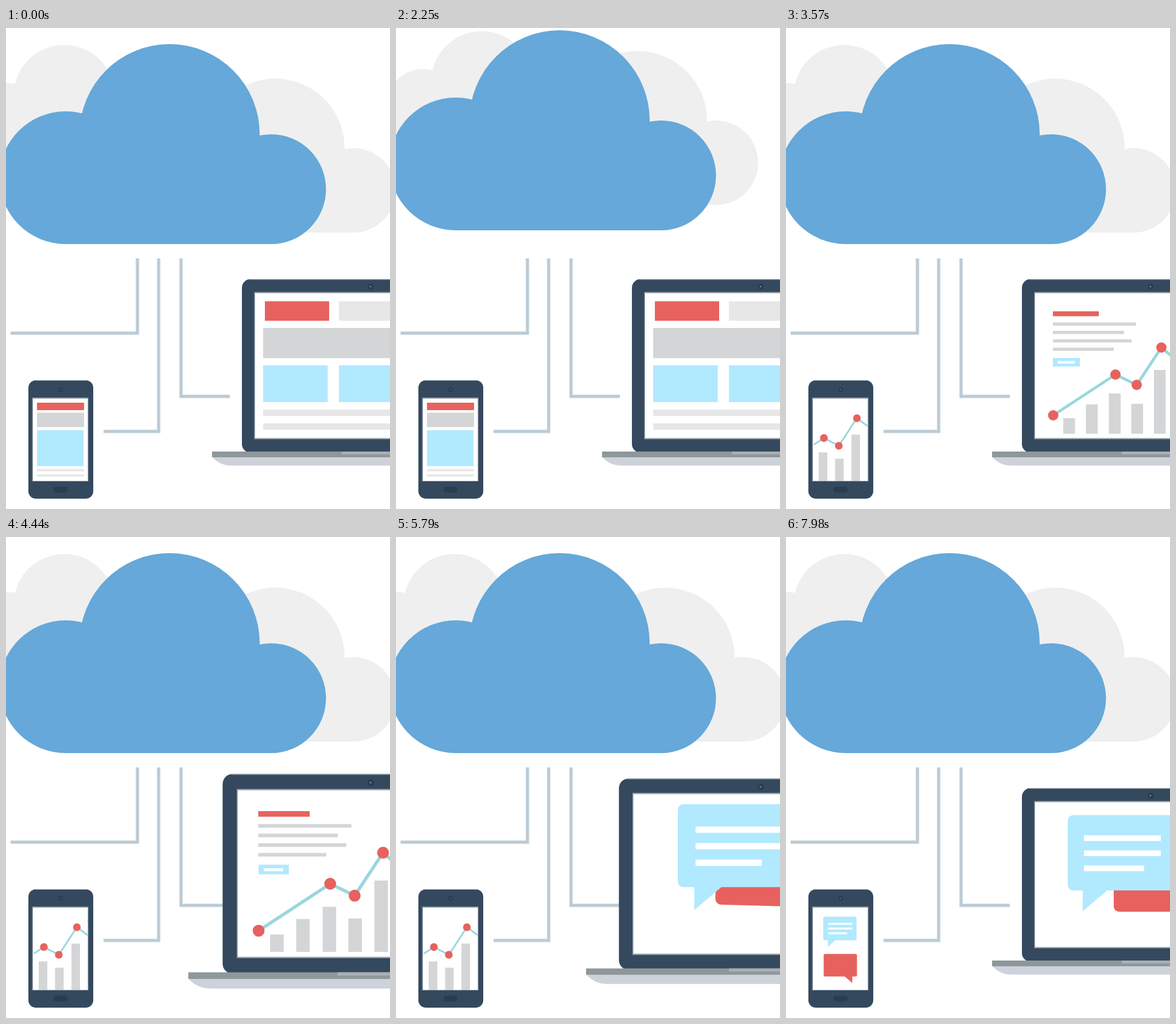
Animation of 669 by 837 pixels, one loop 8 s. Source, as an HTML page with a canvas:

```html
<!DOCTYPE html>
<html lang="en">
<head>
<meta charset="utf-8">
<title>Cloud sync</title>
<style>
  html, body { margin: 0; width: 100%; height: 100%; overflow: hidden; background: #fff; }
  canvas { display: block; }
</style>
</head>
<body>
<canvas id="stage" width="669" height="837"></canvas>
<script>
const ctx = document.getElementById('stage').getContext('2d');
const LOOP = 8000;
const DARK = '#34495e', DEEP = '#2c3c4f', RED = '#e7625e', SKY = '#b1e9ff',
      MID = '#d4d5d7', PALE = '#e7e7e7', BLUE = '#65a8d9', GREY = '#efefef', WIRE = '#bccad4';

const WIRES = {
  left: [[229, 401], [229, 531], [8, 531]],
  middle: [[266, 401], [266, 702], [170, 702]],
  right: [[305, 401], [305, 641], [390, 641]]
};

// Timing helpers
const clamp = v => Math.min(1, Math.max(0, v));
const span = (t, start, length) => clamp((t - start) / length);
const inOut = p => p < .5 ? 2 * p * p : 1 - 2 * (1 - p) * (1 - p);
const out = p => 1 - (1 - p) ** 3;
const back = p => 1 + 2.7 * (p - 1) ** 3 + 1.7 * (p - 1) ** 2;
const swell = (t, grow, shrink) =>
  1 + .15 * (back(span(t, grow, 240)) - inOut(span(t, shrink, 250)));
const bounce = (t, start) => out(span(t, start, 200)) - inOut(span(t, start + 200, 250));

// Drawing helpers
function box(x, y, w, h, color, r = 0) {
  ctx.fillStyle = color;
  ctx.beginPath();
  ctx.roundRect(x, y, w, h, r);
  ctx.fill();
}
function disc(x, y, r, color) {
  ctx.fillStyle = color;
  ctx.beginPath();
  ctx.arc(x, y, Math.max(0, r), 0, 7);
  ctx.fill();
}
function polygon(points, color) {
  ctx.fillStyle = color;
  ctx.beginPath();
  points.forEach(p => ctx.lineTo(...p));
  ctx.fill();
}
function polyline(points, color, width) {
  ctx.strokeStyle = color;
  ctx.lineWidth = width;
  ctx.beginPath();
  points.forEach(p => ctx.lineTo(...p));
  ctx.stroke();
}
function scaled(x, y, s, draw) {
  ctx.save();
  ctx.translate(x, y);
  ctx.scale(s, s);
  ctx.translate(-x, -y);
  draw();
  ctx.restore();
}
const distance = (a, b) => Math.hypot(b[0] - a[0], b[1] - a[1]);

// Point on a path and the part of the path leading to it
function follow(points, p) {
  const total = points.slice(1).reduce((sum, q, i) => sum + distance(points[i], q), 0);
  let rest = p * total;
  const passed = [points[0]];
  for (let i = 1; i < points.length; i++) {
    const a = points[i - 1], b = points[i], d = distance(a, b);
    const k = Math.min(1, rest / d);
    passed.push([a[0] + (b[0] - a[0]) * k, a[1] + (b[1] - a[1]) * k]);
    if (rest <= d) break;
    rest -= d;
  }
  return passed;
}

// A cloud placed by the centre of its big lobe
function cloud(x, y, s, color) {
  ctx.save();
  ctx.translate(x, y);
  ctx.scale(s, s);
  disc(0, 0, 157, color);
  disc(-181, 75.5, 115.5, color);
  disc(177, 95.5, 95.5, color);
  box(-154, 2, 311, 189, color);
  box(-181, 75, 358, 116, color);
  ctx.restore();
}

function clouds(t) {
  const b = bounce(t, 2050) + bounce(t, 6240);
  cloud(101.5 + 48 * b, 118 - 24 * b, .563, GREY);
  cloud(469 - 48 * b, 209 - 48 * b, .77, GREY);
  cloud(285, 185 - 24 * b, 1, BLUE);
}

function packet(t, wire, start, length, up) {
  const p = (t - start) / length;
  if (p < 0 || p > 1) return;
  const [x, y] = follow(WIRES[wire], inOut(up ? 1 - p : p)).pop();
  disc(x, y, 9.5, '#689fcb');
}

// Speech bubble placed by the tip of its tail; dir -1 mirrors it
function bubble(x, y, s, p, dir, color) {
  if (p <= 0) return;
  const angle = -dir * 55 * Math.exp(-3.6 * p) * (1 - p) * -Math.cos(2 * Math.PI * p);
  const height = dir > 0 ? 131 : 125;
  ctx.save();
  ctx.translate(x, y);
  ctx.rotate(angle * Math.PI / 180);
  s *= back(clamp(p * 2));
  ctx.scale(dir * s, s);
  box(-26, -36 - height, 185, height, color, 9);
  polygon([[0, 0], [0, -38], [45, -38]], color);
  if (dir > 0) [134, 134, 105].forEach((w, i) => box(2, -132 + 26.2 * i, w, 10, '#fff'));
  ctx.restore();
}

// Blocks of [x, y, width, height, colour] that shrink around their centres
function blocks(list, k) {
  if (k <= 0) return;
  for (const [x, y, w, h, color] of list)
    scaled(x + w / 2, y + h / 2, k, () => box(x, y, w, h, color));
}

function chart(bars, barWidth, base, points, dots, radius, width, k) {
  if (k <= 0) return;
  bars.forEach(([x, y]) => box(x, base - (base - y) * k, barWidth, (base - y) * k, MID));
  polyline(follow(points, k), '#9bd6df', width);
  dots.forEach((n, i) => disc(...points[n], radius * back(clamp(k * 2 - i * .25)), RED));
}

function laptop(t) {
  const s = swell(t, 4170, 5690);
  scaled(635, 600, s, () => {
    box(411, 437, 448, 302, DARK, 15);
    box(424, 437, 422, 1.2, '#8795a0');
    disc(635.5, 450, 5, DEEP);
    disc(635, 450, 1.3, '#8295a8');
    box(432.5, 459.5, 405, 256, '#9ca6b0');
    box(434, 461.5, 402, 252, '#fff');
    ctx.fillStyle = '#cdd2db';
    ctx.beginPath();
    ctx.moveTo(359, 746);
    ctx.quadraticCurveTo(372, 761.5, 393, 761.5);
    ctx.lineTo(877, 761.5);
    ctx.quadraticCurveTo(898, 761.5, 911, 746);
    ctx.fill();
    box(359, 737, 552, 10, '#8e979a');
    box(585, 737, 101, 5, '#a9afb5');

    blocks([
      [451, 475.5, 112, 34, RED], [580, 475.5, 112, 34, PALE], [710, 475.5, 112, 34, PALE],
      [448, 522, 374, 52.5, MID],
      [448, 587, 112.5, 64, SKY], [580, 587, 112.5, 64, SKY], [710, 587, 112, 64, SKY],
      [448, 664, 374, 11, PALE], [448, 688, 374, 11, PALE]
    ], 1 - inOut(span(t, 2860, 240)));

    const k = out(span(t, 3060, 500)) - inOut(span(t, 4400, 350));
    if (k > 0) {
      box(465, 493, 80 * k, 8.5, RED);
      [145, 124, 137, 106].forEach((w, i) => box(465, 512.5 + 14.6 * i, w * k, 5.5, MID));
      scaled(488, 581.5, k, () => {
        box(465, 574, 47, 15, SKY);
        box(473, 579.5, 30, 4.5, '#fff');
      });
    }
    chart([[483, 679], [522.5, 655], [562.5, 636], [601.5, 654], [641, 595]], 20.5, 706,
      [[465.5, 674], [574, 603], [611, 621], [654, 556], [690, 586]], [0, 1, 2, 3], 9, 5, k);
  });
  bubble(733 - 3, 688 - 40 * (s - 1), s, span(t, 5418, 600), -1, RED);
  bubble(491 + 26 * s, 651 - 20 * (s - 1), s, span(t, 4860, 600), 1, SKY);
}

function phone(t) {
  box(39, 613, 113, 206, DARK, 13);
  box(50, 613, 91, 1, '#71808d');
  disc(95, 629, 4, DEEP);
  disc(95, 629, 1.1, '#61758a');
  box(82.5, 798, 25, 10.5, DEEP, 5);
  box(45.5, 643, 98, 146, '#8f9ba6');
  box(47, 645, 95.5, 143, '#fff');

  blocks([
    [54, 652, 82, 13, RED], [54, 669.5, 82, 25, MID], [54, 700, 81, 62.5, SKY],
    [54, 767.5, 82, 4, PALE], [54, 776.5, 82, 4, PALE]
  ], 1 - inOut(span(t, 2860, 240)));

  chart([[57, 738.5], [85.5, 749.5], [114, 707.5]], 15, 788,
    [[48.5, 725], [66, 713.5], [92, 727], [123.5, 679], [142.5, 693]], [1, 2, 3], 6.7, 3,
    out(span(t, 3060, 500)) - inOut(span(t, 6950, 400)));

  bubble(115.5, 776, .3135, span(t, 7530, 440), -1, RED);
  bubble(73, 713, .3135, span(t, 7390, 500), 1, SKY);
}

function tablet(t) {
  scaled(-126, 577.5, swell(t, 665, 1260), () => box(-241, 423, 230, 309, DARK, 14));
}

function draw(t) {
  ctx.fillStyle = '#fff';
  ctx.fillRect(0, 0, 669, 837);
  clouds(t);
  for (const wire of Object.values(WIRES)) {
    polyline(wire, '#dce4e9', 6.5);
    polyline(wire, WIRE, 4.5);
  }
  packet(t, 'left', 1500, 540, true);
  packet(t, 'middle', 2290, 450);
  packet(t, 'right', 2370, 450);
  packet(t, 'right', 5870, 350, true);
  packet(t, 'middle', 6470, 450);
  packet(t, 'left', 6550, 450);
  tablet(t);
  phone(t);
  laptop(t);
}

const begin = performance.now();
function frame() {
  draw((performance.now() - begin) % LOOP);
  requestAnimationFrame(frame);
}
frame();
</script>
</body>
</html>
```
